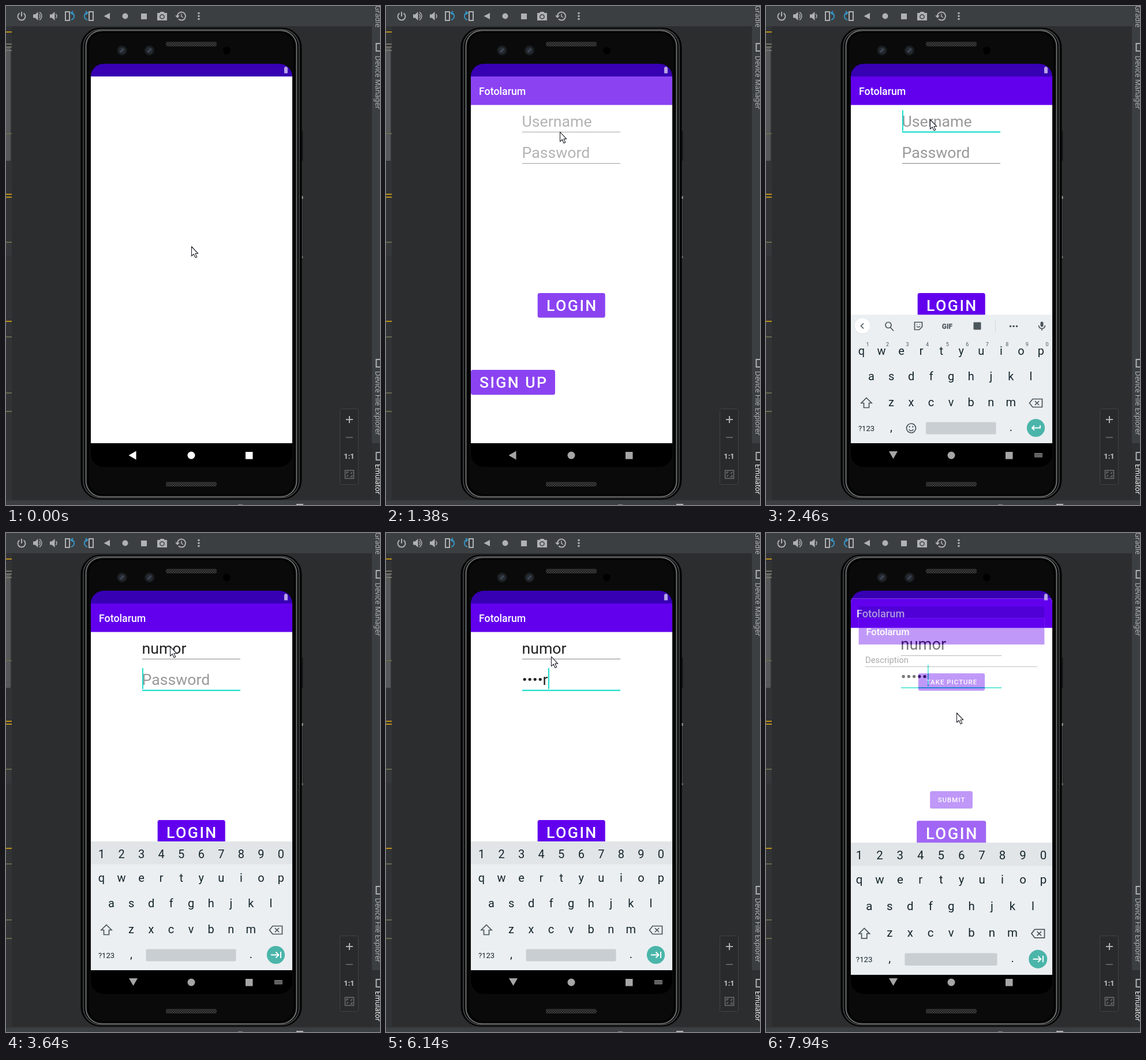
An HTML page that plays this animation: 648 by 864 pixels, repeating every 8000 ms.

```html
<!DOCTYPE html>
<html lang="en">
<head>
<meta charset="utf-8">
<title>Login demo</title>
<style>
html, body { margin: 0; width: 100%; height: 100%; overflow: hidden; background: #2c2d2f; }
svg { display: block; width: 648px; height: 864px; }
text { font-family: Roboto, sans-serif; white-space: pre; }
.side text { font: 12.2px "Noto Sans", sans-serif; fill: #b4b6b8; }
.key { font-size: 20px; fill: #15252c; text-anchor: middle; }
.field { font-size: 26.7px; }
.label { font-weight: 500; fill: #fff; text-anchor: middle; }
.title { font-size: 17.8px; font-weight: 500; fill: #fff; }
.line { fill: none; stroke: #afb1b3; stroke-width: 2; }
.thin { stroke-width: 1.5; }
.kline { fill: none; stroke: #4b565c; stroke-width: 1.7; }
</style>
</head>
<body>
<svg id="stage" viewBox="0 0 648 864" xmlns="http://www.w3.org/2000/svg"></svg>
<script>
const LOOP = 8000;
const APP = "Fotolarum", USER = "numor";
const PURPLE = "#6200ee", DARK = "#3700b3", TEAL = "#03dac5", GREY = "#afb1b3", RULE = "#808080";
const stage = document.getElementById("stage");

const rect = (x, y, w, h, fill, extra = "") =>
  `<rect x="${x}" y="${y}" width="${w}" height="${h}" fill="${fill}" ${extra}/>`;
const circle = (x, y, r, fill, extra = "") => `<circle cx="${x}" cy="${y}" r="${r}" fill="${fill}" ${extra}/>`;
const path = (d, extra) => `<path d="${d}" ${extra}/>`;
const text = (x, y, s, extra = "") => `<text x="${x}" y="${y}" ${extra}>${s}</text>`;
const group = (id, body, extra = "") => `<g id="${id}" ${extra}>${body}</g>`;

function button(x, y, w, h, label, size) {
  const spacing = size * 0.0893;
  return rect(x, y + 1, w, h, "#000", 'rx="3.5" opacity=".14"') + rect(x, y, w, h, PURPLE, 'rx="3.5"') +
    text(x + w / 2 + spacing / 2, y + h / 2 + size * 0.365, label,
      `class="label" font-size="${size}" letter-spacing="${spacing}"`);
}

function toolbar() {
  const speaker = x => path(`M${x} 14.500h3.500l5 -4.500v15l-5 -4.500h-3.500z`, `fill="${GREY}"`);
  const blue = 'fill="none" stroke="#3592c4" stroke-width="2"';
  return rect(0, 0, 648, 35, "#3c3f41") +
    path("M23.500 12.500a6.500 6.500 0 1 0 7 0M27 10v8", 'class="line"') +
    speaker(47) + path("M57.500 14q3 3.500 0 7M58 10.500q8 7 0 14", 'class="line thin"') +
    speaker(76) + path("M86.500 14q3 3.500 0 7", 'class="line thin"') +
    path("M103 10h7v15h-7z", 'class="line"') +
    path("M113 24q6 -2 5 -8q-1 -4 -5 -4M116 9l-3.500 3l3.500 3", blue) +
    path("M144 10h7v15h-7z", 'class="line"') +
    path("M141 24q-6 -2 -5 -8q1 -4 5 -4M138 9l3.500 3l-3.500 3", blue) +
    path("M180 12v11l-10.500 -5.500z", `fill="${GREY}"`) +
    circle(206.5, 17.5, 5, GREY) + rect(234, 13, 10, 10, GREY) +
    path("M262 12h4l2 -2h5l2 2h4v13h-17z", `fill="${GREY}"`) +
    circle(270.5, 18.5, 3.6, GREY, 'stroke="#3c3f41" stroke-width="1.5"') +
    path("M297 17.500a7 7 0 1 1 2 5", 'class="line"') +
    path("M293 16.500h8l-4 4.500z", `fill="${GREY}"`) + path("M304 13.500v4.500l3 2", 'class="line thin"') +
    [12.5, 17.5, 22.5].map(y => circle(334, y, 1.8, GREY)).join("");
}

function sideBars() {
  const marks = (ys, color) => ys.map(y => rect(0, y - 1, 10, 2, color)).join("");
  const tab = (y, label, extra = "") => `<text transform="translate(639.500 ${y}) rotate(90)" ${extra}>${label}</text>`;
  const icon = y => rect(641.5, y, 10, 13, "none", 'class="line"');
  return rect(0, 35, 10, 829, "#313335") + rect(0, 72, 8, 196, "#565859") + rect(0, 409, 10, 24, "#353739") +
    marks([45, 326, 331, 546], "#be9117") + marks([66, 71, 77], "#77756a") +
    marks([221, 409, 573, 670, 702], "#69694f") +
    rect(634, 0, 14, 864, "#3c3f41") + rect(634, 757, 14, 99, "#2d2f31") +
    `<g class="side">` + tab(-1, "Gradle") + tab(86, "Device Manager") + tab(632, "Device File Explorer") +
    tab(793, "Emulator", 'style="fill:#fff"') + `</g>` + icon(65) + icon(612) + icon(773) +
    rect(0, 855, 648, 9, "#3c3f41") + rect(0, 855, 648, 1.5, "#323436") + rect(503, 862, 12, 2, GREY) +
    rect(402, 863, 8, 1, "#8a8c8e");
}

function zoomPanel() {
  return rect(578.5, 697.5, 32, 131, "#292a2c", 'rx="3" stroke="#404244"') +
    path("M589 716h12M595 710v12", 'class="line"') + path("M589 747h12", 'class="line" opacity=".4"') +
    text(594.5, 783.5, "1:1", 'font-size="13" font-weight="700" fill="#c0c2c4" text-anchor="middle"') +
    `<g opacity=".5">` + rect(587.5, 804, 15, 14, "none", 'class="line thin"') +
    path("M590.500 810v-3h3M599.500 812v3h-3M600 807l-3 3M590 815l3 -3", 'class="line thin"') + `</g>`;
}

function phone() {
  const shell = (dx, dy, radius, color, width, fill = "none") =>
    rect(130 + dx, 38 + dy, 382 - 2 * dx, 816 - 2 * dy, fill,
      `rx="${radius}" stroke="${color}" stroke-width="${width}"`);
  const lens = x => circle(x, 77, 8.5, "#1b1e21") + circle(x, 77, 5.5, "#262c34") +
    path(`M${x - 3} 80l6 -6`, 'stroke="#454e5a" stroke-width="2"');
  const grille = y => rect(277, y, 88, 8, "url(#mesh)", 'rx="3"');
  return rect(510, 216, 4.5, 52, "#17181a", 'rx="1"') + rect(510, 328, 4.5, 110, "#17181a", 'rx="1"') +
    rect(512.5, 329, 2, 5, "#b0b0b0") + rect(513, 334, 1, 100, "#55575a") + rect(512.5, 433, 2, 4, "#777") +
    shell(0.5, 0.5, 33, "#030303", 2, "#080808") + shell(4, 2.5, 30, "#4a4c4d", 1.5) +
    shell(8.5, 4.5, 27, "#6c6e6f", 2) + shell(12.5, 7, 25, "#030303", 3, "#0a0a0a") +
    lens(201) + lens(248.5) + circle(382.5, 77, 6.5, "#000") + grille(62) + grille(824);
}

function keyboard() {
  const row = (keys, x, y) => [...keys].map((k, i) => text(x + 34.55 * i, y, k, 'class="key"')).join("");
  const hints = [..."1234567890"].map((d, i) =>
    text(176 + 34.55 * i, 589, d, 'font-size="9" fill="#4b565c" text-anchor="middle"')).join("");
  const tools =
    path("M215.500 556.500l5.500 6", 'class="kline"') + circle(212, 552.5, 5, "none", 'class="kline"') +
    path("M257.500 547.500h13v8l-5 5h-8zM261 551.500h1M266 551.500h1M261 554.500q3 3 6 0", 'class="kline"') +
    text(314, 558.5, "GIF", 'font-size="12" font-weight="900" fill="#4b565c" text-anchor="middle"') +
    rect(359.5, 547.5, 13, 13, "#4b565c", 'rx="1"') +
    rect(397, 544, 1, 21, "#d2d7da") + [423.5, 429, 434.5].map(x => circle(x, 554.5, 1.8, "#4b565c")).join("");
  const plain = circle(167, 554.5, 13.5, "#000", 'opacity=".12"') + circle(167, 554, 13.3, "#fff") +
    path("M169 549.500l-4.500 4.500l4.500 4.500", 'id="chevron" class="kline"') + group("tools", tools) +
    rect(475.5, 546.5, 5, 9, "#4b565c", 'rx="2.5"') + path("M472.500 553q.5 5.500 5.500 5.500t5.500 -5.500M478 558v4", 'class="kline"') +
    hints + circle(251.5, 731, 8, "none", 'class="kline"') +
    circle(248.7, 728.5, 1.2, "#4b565c") + circle(254.3, 728.5, 1.2, "#4b565c") +
    path("M247.500 733q4 5 8 0", 'class="kline"') + rect(277, 720.5, 121.5, 21, "#c9ced2", 'rx="2"');
  const secret = rect(146, 534, 351, 39.5, "#e1e5e8") + row("1234567890", 165.5, 562.5) +
    rect(242.5, 720.5, 156, 21, "#c9ced2", 'rx="2"');
  return rect(146, 534.5, 351, 222.5, "#ebeff2") + group("plainKeys", plain) + group("secretKeys", secret) +
    row("qwertyuiop", 165.5, 603.5) + row("asdfghjkl", 182.5, 648) + row("zxcvbnm", 217, 693) +
    path("M174 678.500l9 9h-4.500v8h-9v-8h-4.500z", 'class="kline"') +
    path("M462 680.500h16.500v14h-16.500l-5.500 -7zM466 684l7 7M473 684l-7 7", 'class="kline"') +
    text(174, 735.5, "?123", 'class="key" style="font-size:13px"') + text(217, 736, ",", 'class="key"') +
    text(424.5, 736, ".", 'class="key"') + circle(467.5, 730.5, 15.6, "#4bb5aa") +
    path("", 'id="enter" fill="none" stroke="#fff" stroke-width="1.9"');
}

const appBar = () => rect(147, 122, 349, 49.4, PURPLE) + text(161, 153.5, APP, 'class="title"');

const loginScreen = () =>
  rect(147, 122, 349, 635, "#fff") +
  group("content",
    appBar() + text(235.5, 208.5, "", 'id="user" class="field"') + rect(236, 217.7, 170, 1, RULE, 'id="userLine"') +
    text(235.5, 263, "Password", 'id="passHint" class="field" fill="#999"') + group("dots", "") +
    text(0, 263, "", 'id="lastChar" class="field" fill="#212121"') +
    rect(236, 272, 170, 1, RULE, 'id="passLine"') + rect(0, 0, 1.8, 36, TEAL, 'id="caret"') +
    button(262.7, 497, 117, 42.5, "LOGIN", 26.7) +
    circle(321, 516, 54, "#fff", 'id="ripple" clip-path="url(#loginClip)"') +
    button(147, 630, 146, 43, "SIGN UP", 26.7));

const postScreen = () =>
  rect(147, 100, 349, 22, DARK) + rect(147, 122, 349, 635, "#fff") + appBar() +
  text(159.5, 206.5, "Description", 'font-size="16" fill="#2b2b2b"') +
  rect(159.5, 212.6, 323, 1, "#555") + button(259, 225.5, 125, 32.5, "TAKE PICTURE", 12.4) +
  button(281, 446.8, 80, 32.5, "SUBMIT", 12.4);

stage.innerHTML = `<defs>
  <pattern id="mesh" width="4" height="4" patternUnits="userSpaceOnUse">${rect(0, 0, 4, 4, "#181818")}
    ${path("M0 0l4 4M4 0l-4 4", 'stroke="#434343" stroke-width="1"')}</pattern>
  <clipPath id="screenClip">${rect(147, 100, 349, 698, "#000", 'rx="22"')}</clipPath>
  <clipPath id="loginClip">${rect(262.7, 497, 117, 42.5, "#000", 'rx="3.5"')}</clipPath>
  <clipPath id="keysClip">${rect(146, 500, 351, 257, "#000")}</clipPath></defs>` +
  rect(0, 0, 648, 864, "#2c2d2f") + toolbar() + sideBars() + zoomPanel() + phone() +
  `<g clip-path="url(#screenClip)">` + rect(147, 100, 349, 698, "#000") + rect(147, 100, 349, 22, DARK) +
  group("login", loginScreen()) + group("post", postScreen()) +
  group("keysWindow", group("keys", keyboard()), 'clip-path="url(#keysClip)"') +
  path("M482 106.500h1.500v-1.500h3v1.500h1.500v10h-6z", 'fill="#b8a3e4"') +
  group("nav", path("", 'id="back"') + circle(321, 778, 6.5, "inherit", 'style="fill:inherit"') +
    rect(415, 772, 12.5, 12.5, "inherit", 'style="fill:inherit"')) +
  group("keysIcon", rect(465, 774, 14, 7.5, "#777", 'rx="1"') +
    path("M466 776.500h12M466 779h12", 'stroke="#000" stroke-width="1" stroke-dasharray="1 1.200"')) + `</g>` +
  path("M.5 .5V17l3.800 -3.500l2.800 6.300l2.700 -1.200l-2.800 -6.100h4.700z",
    'id="pointer" fill="#fff" stroke="#22242c" stroke-width="1.100" stroke-linejoin="round"');

const $ = {};
stage.querySelectorAll("[id]").forEach(el => { $[el.id] = el; });
const set = (id, attrs) => { for (const k in attrs) $[id].setAttribute(k, attrs[k]); };
const show = (id, on) => set(id, { visibility: on ? "inherit" : "hidden" });

const span = (a, b, n) => Array.from({ length: n }, (_, i) => Math.round(a + (b - a) * i / (n - 1)));
const ticks = [0, ...span(390, 1380, 7), ...span(1500, 2460, 8), ...span(2610, 3150, 5), 3640, 3920,
  ...span(4230, 4490, 3), 4770, 5330, 5730, ...span(6020, 6920, 8), 7070, 7220, 7650, 7800, 7940];
const held = t => ticks.filter(x => x <= t).pop();

const clamp = x => Math.max(0, Math.min(1, x));
const ease = x => x * x * (3 - 2 * x);
const between = (t, a, b) => t >= a && t < b;
const moves = [[225, 321, 416], [1400, 301, 217.5], [1800, 284, 196], [5900, 284, 196], [6740, 319, 515],
  [7560, 319, 515], [7940, 330, 311]];

function pointerAt(t) {
  const i = moves.findIndex(m => m[0] > t);
  if (i === 0) return moves[0].slice(1);
  if (i < 0) return moves[moves.length - 1].slice(1);
  const [t0, x0, y0] = moves[i - 1], [t1, x1, y1] = moves[i];
  const k = ease((t - t0) / (t1 - t0));
  return [x0 + (x1 - x0) * k, y0 + (y1 - y0) * k];
}

const zoom = s => `translate(321.400 449) scale(${s}) translate(-321.400 -449)`;

function render(now) {
  const t = held(now % LOOP);
  const [px, py] = pointerAt(t);
  set("pointer", { transform: `translate(${px} ${py})` });

  const fade = clamp((t - 1085) / 400);
  set("content", { opacity: fade });

  const typed = clamp((t - 2475) / 675) * USER.length + 1e-6 | 0;
  $.user.textContent = typed ? USER.slice(0, typed) : "Username";
  set("user", { fill: typed ? "#212121" : "#999" });

  const secret = t >= 3640, focused = t >= 2030;
  const count = t >= 4770 ? 5 : t >= 4490 ? 4 : t >= 4360 ? 3 : t >= 4230 ? 1 : 0;
  const plain = count > 0 && t < 6270;
  const dotCount = plain ? count - 1 : count;
  show("passHint", !count);
  $.dots.innerHTML = Array.from({ length: dotCount }, (_, i) => circle(240.2 + 9 * i, 253.5, 2.6, "#212121")).join("");
  $.lastChar.textContent = plain ? USER[count - 1] : "";
  set("lastChar", { x: 235.5 + 9 * dotCount });

  const line = (id, y, on) => set(id, { y: on ? y - 0.5 : y, height: on ? 2 : 1, fill: on ? TEAL : RULE });
  line("userLine", 217.7, focused && !secret);
  line("passLine", 272, secret);
  const blinkOff = [[3920, 4230], [5330, 5730], [6250, 6750], [7220, 7650]].some(([a, b]) => between(t, a, b));
  show("caret", focused && !blinkOff);
  const width = secret ? 9 * dotCount + $.lastChar.getComputedTextLength()
    : typed ? $.user.getComputedTextLength() : 0;
  set("caret", { x: 236 + width, y: secret ? 234 : 180.5 });

  const pressed = between(t, 6900, 7220);
  show("ripple", pressed);
  set("ripple", { r: t < 7000 ? 54 : 70, opacity: t < 7000 ? 0.38 : 0.24 });

  const keysUp = t >= 2300;
  show("keys", keysUp);
  set("keys", { transform: `translate(0 ${222 * (1 - ease(clamp((t - 2220) / 200)))})` });
  show("plainKeys", !secret);
  show("secretKeys", secret);
  show("tools", !typed);
  set("chevron", { transform: typed ? "translate(334 0) scale(-1 1)" : "" });
  set("enter", { d: secret ? "M459 730.500h13M467.500 725.500l5 5l-5 5M476 725v11"
    : "M475 726v4.500h-14M465 726.500l-4 4l4 4" });
  set("nav", { fill: fade > 0 ? "#a6a6a6" : "#fff" });
  set("back", { d: keysUp ? "M213 771h15l-7.500 13z" : "M225.500 770.500v15l-13 -7.500z" });

  const open = clamp((t - 7800) / 280);
  show("post", open > 0);
  set("post", { opacity: open * 0.8, transform: zoom(0.85 + 0.144 * open) });
  set("login", { transform: zoom(1 + 0.0512 * open) });
  set("keysWindow", { transform: zoom(1 + 0.0512 * open) });
  show("keysIcon", keysUp && open === 0);
}

const start = performance.now();
function frame() {
  render(performance.now() - start);
  requestAnimationFrame(frame);
}
frame();
</script>
</body>
</html>
```
